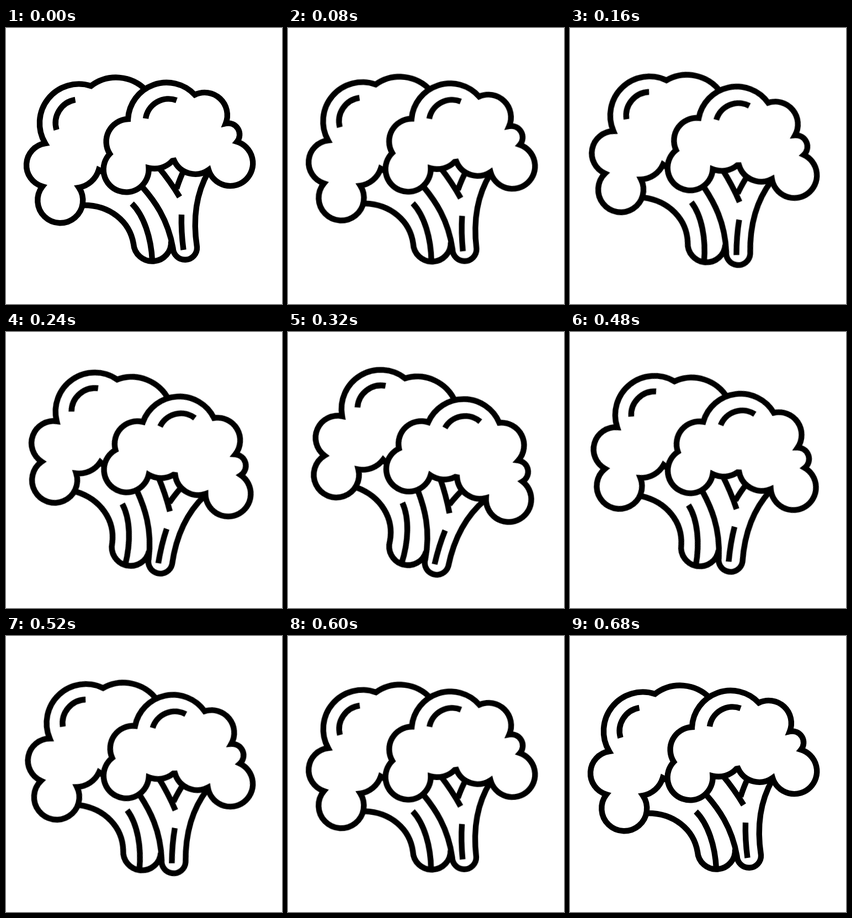
An HTML page that plays this animation: 500 px wide and 500 px high, repeating every 1.32 s.

```html
<!DOCTYPE html>
<html lang="en">
<head>
<meta charset="utf-8">
<title>Swaying broccoli</title>
<style>
  html, body { margin: 0; width: 100%; height: 100%; overflow: hidden; background: #fff; }
  svg { display: block; width: 100%; height: 100%; }
  #plant {
    fill: none; stroke: #000; stroke-width: 10.4; stroke-miterlimit: 6;
    transform-origin: 241.5px 256px;
  }
  .solid { fill: #fff; }
</style>
</head>
<body>
<svg viewBox="0 0 500 500">
  <g id="plant">
    <!-- back floret -->
    <path d="M141 321 C188 321 224 350 231 391 A34 34 0 0 0 299 386"/>
    <path d="M228 318 C250 340 263 380 265 422"/>
    <path d="M254 113 A75 75 0 0 0 154 105 A71 71 0 0 0 71 209
             A40 40 0 0 0 66 287 A41 41 0 1 0 132 289
             A46 46 0 0 0 168 257 L182 264"/>
    <path d="M125.500 130 A43 43 0 0 0 91.500 184.500"/>
    <!-- front floret -->
    <path class="solid" d="M247 288 C268 312 293 345 302.500 399
             A21.700 21.700 0 0 0 346 397 C338 345 344 300 367 260"/>
    <path d="M276 252 Q297 277 314.500 306 M323 256 Q316 270 309 291"/>
    <path d="M318 338 Q317 368 321.500 402"/>
    <path class="solid" d="M221 165 A70 70 0 0 1 342 121 A41 41 0 0 1 398 173
             A20.500 20.500 0 0 1 418.500 206 A41 41 0 1 1 367 257
             A42 42 0 0 1 304.500 240 L301.500 240.500
             A44 44 0 0 1 258.500 253.500 A41 41 0 1 1 188 228
             A41 41 0 0 1 221 165 Z"/>
    <path d="M253 164 A42 42 0 0 1 309 131"/>
  </g>
</svg>
<script>
  const LOOP = 1320, STEP = 40;
  // tilt in degrees, one entry per step; rests upright afterwards
  const tilt = [0, 0.4, 1.8, 4.2, 7.6, 12.2, 16.8, 19.2, 20.4, 20.5,
                19.4, 17.1, 12.7, 8, 4.5, 2, 0.5, 0];
  const frames = tilt.map((a, i) => ({
    transform: `rotate(${a}deg)`, offset: i * STEP / LOOP, easing: 'steps(1, end)'
  }));
  frames.push({ transform: 'rotate(0deg)', offset: 1 });
  document.getElementById('plant').animate(frames, { duration: LOOP, iterations: Infinity });
</script>
</body>
</html>
```
